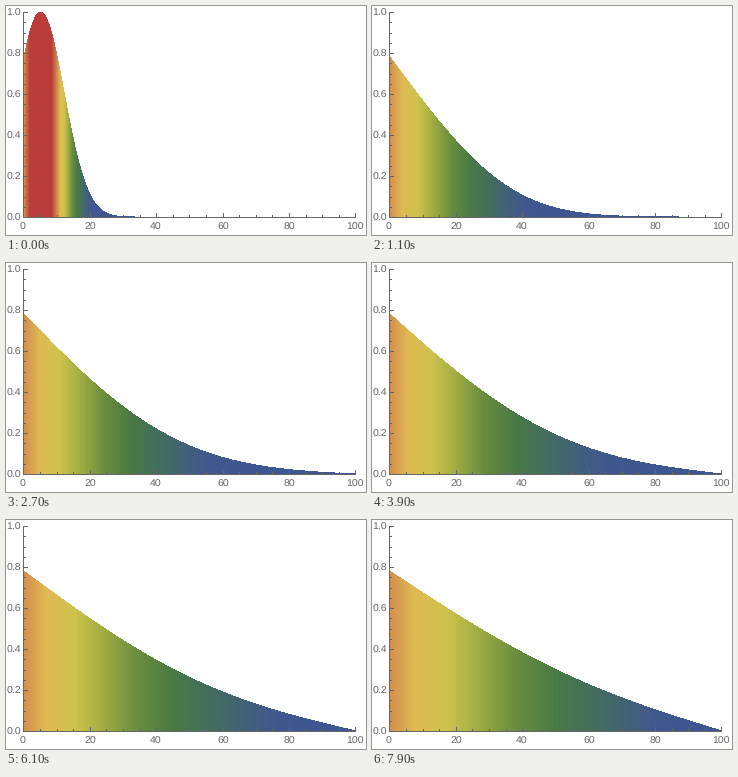
A matplotlib script that plays this animation: 360x229 px, repeating every 8 s.

```python
import numpy as np
import matplotlib.pyplot as plt
from matplotlib.animation import FuncAnimation
from matplotlib.colors import LinearSegmentedColormap

W, H, DPI = 360, 229, 100
FRAMES, INTERVAL = 80, 100
X0, Y0 = 18, 211              # plot origin in pixels
SX, SY = 3.32, 205            # pixels per unit
GRAY = "0.4"

LENGTH, STEP = 100, 20        # rod length, diffusivity * time per frame
MODES = 300

# Evenly spaced stops from cold to hot
dark_rainbow = LinearSegmentedColormap.from_list("dark_rainbow", [
    "#3d5793", "#41588e", "#436c62", "#4a7a45", "#6a8e3e",
    "#9fac43", "#cfc34d", "#e0ba53", "#cf844d", "#ba3d3b"], N=1024)

plt.rcParams["text.hinting"] = "none"


def start(x):
    return np.exp(-(x - 5) ** 2 / 100)


def steady(x):
    return start(0) * (1 - x / LENGTH)


# Sine series of the heat equation with both ends held fixed
k = np.arange(1, MODES + 1) * np.pi / LENGTH
grid = np.linspace(0, LENGTH, 4001)
coef = 2 / LENGTH * np.sin(np.outer(k, grid)) @ (start(grid) - steady(grid))
coef *= grid[1] - grid[0]

# Samples at the left edge, centre and right edge of each pixel column
cols = np.arange(X0, 350)
xs = np.clip((np.arange(2 * len(cols) + 1) / 2) / SX, 0, LENGTH)
basis = np.sin(np.outer(xs, k))
rows = np.arange(H)[:, None]


def heat(i):
    u = steady(xs) + basis @ (coef * np.exp(-k ** 2 * STEP * i))
    return np.clip(u, 0, 1)


def shade(i):
    """Colour every pixel that the area under the curve touches."""
    u = heat(i)
    left, mid, right = u[:-1:2], u[1::2], u[2::2]
    top = Y0 - np.ceil(SY * np.maximum(left, right) - 0.07)
    img = np.zeros((H, W, 4))
    img[:, cols, :3] = dark_rainbow(mid / 0.9)[:, :3]
    img[:, cols, 3] = (rows >= top) & (rows < Y0)
    return img


fig = plt.figure(figsize=(W / DPI, H / DPI), dpi=DPI, facecolor="white")
ax = fig.add_axes([0, 0, 1, 1])
ax.set_axis_off()
area = ax.imshow(shade(0), extent=(0, W, H, 0), interpolation="nearest",
                 aspect="auto", zorder=1)
ax.set(xlim=(0, W), ylim=(H, 0))


def bar(x, y, w, h):
    ax.add_patch(plt.Rectangle((x, y), w, h, fc=GRAY, lw=0,
                               antialiased=False, zorder=2))


def label(x, y, text, ha):
    ax.text(x, y, text, ha=ha, va="baseline", color=GRAY,
            family="Liberation Sans", size=10.5 * 72 / DPI, zorder=3)


bar(17, 6, 1, 206)
bar(17, 211, 333, 1)
for n in range(21):
    size = 2 if n % 4 else 4
    tx = round(17.4 + n * 5 * SX)
    ty = int(Y0 - n * SY / 20 + 0.5)
    bar(tx, Y0 - size, 1, size)
    bar(18, ty, size, 1)
    if n % 4 == 0:
        label(tx, 224, str(n * 5), "center")
        label(15, ty + 4, f"{n / 20:.1f}", "right")


def update(i):
    area.set_data(shade(i))
    return [area]


anim = FuncAnimation(fig, update, frames=FRAMES, interval=INTERVAL,
                     repeat=True, repeat_delay=0, blit=False)
plt.show()
```
